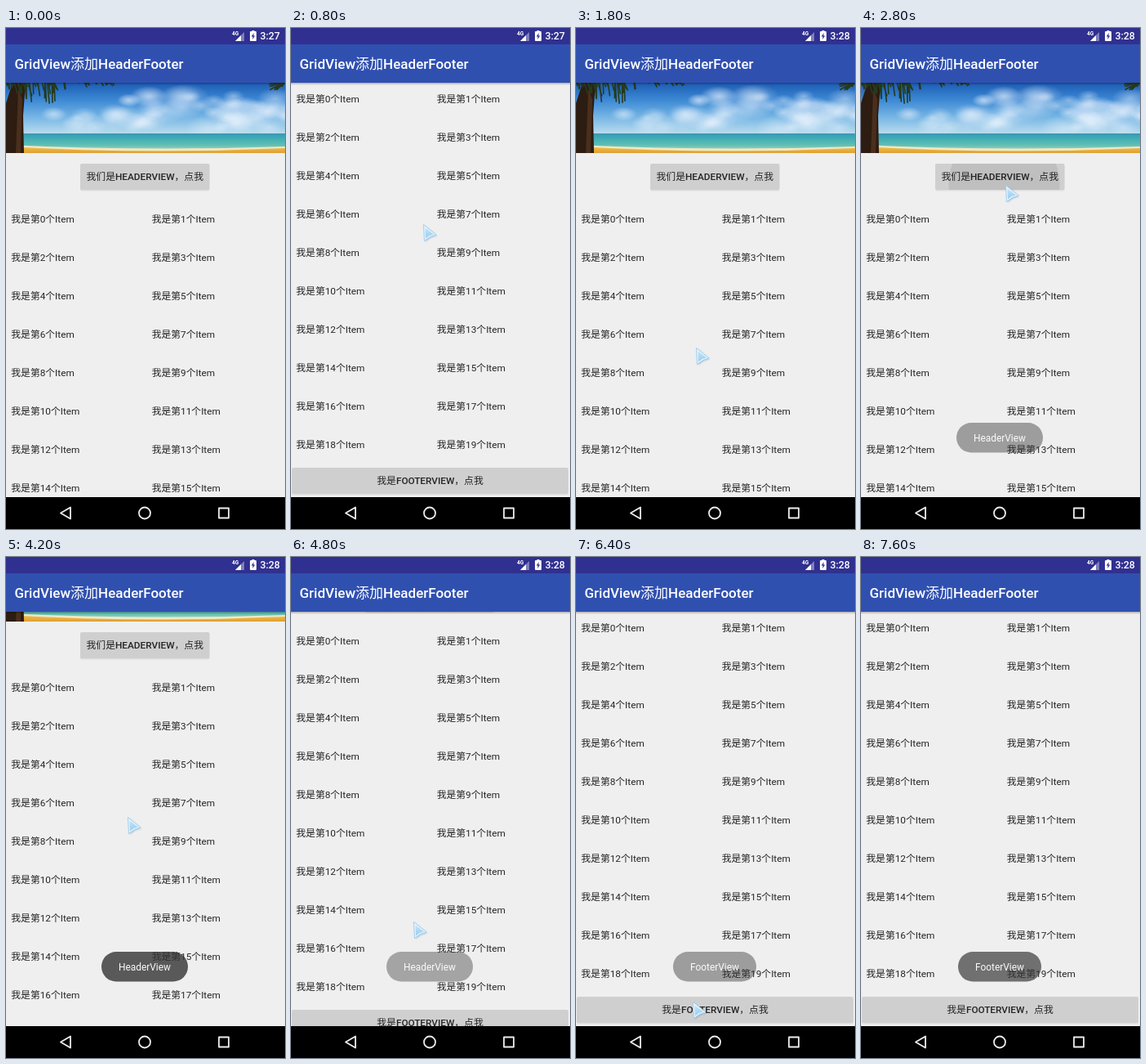
An HTML page with a canvas that plays this animation: 342 by 613 pixels, repeating every 8400 ms.

```html
<!DOCTYPE html>
<html lang="zh-CN">
<head>
<meta charset="utf-8">
<title>GridView</title>
<style>
  html, body { margin: 0; width: 100%; height: 100%; overflow: hidden; background: #000; }
  canvas { display: block; width: 342px; height: 613px; }
</style>
</head>
<body>
<canvas id="stage" width="342" height="613"></canvas>
<script>
const ctx = document.getElementById('stage').getContext('2d');
const W = 342, H = 613, LOOP = 8400, STEP = 200, REST = 7600;
const LIST_TOP = 67, LIST_BOTTOM = 574, MAX_SCROLL = 147, ROW = 47;

// Places the pointer stops at: time, x, y
const STOPS = [
  [200, 158, 362], [800, 162, 240], [1200, 155, 326], [1800, 147, 391],
  [2400, 177, 192], [2800, 177, 192], [3800, 152, 410], [4200, 149, 318],
  [5600, 150, 508], [6800, 142, 548], [REST, 310, 556]
];

const clamp = v => Math.min(1, Math.max(0, v));
const easeOut = (p, power) => 1 - (1 - clamp(p)) ** power;
const glide = (t, from, to) => easeOut((t - from) / (to - from), 3);
const fade = (t, from, to) => clamp(Math.min((t - from) / 360, (to - t) / 400));

function scrollAt(t) {
  return Math.round(MAX_SCROLL * (glide(t, 0, 800) - glide(t, 1000, 1788) + glide(t, 3800, 5720)));
}

function pointerAt(t) {
  const i = STOPS.findIndex(s => s[0] > t);
  const [t0, x0, y0] = STOPS[i - 1], [t1, x1, y1] = STOPS[i];
  const k = easeOut((t - t0) / (t1 - t0), 2);
  return [Math.round(x0 + (x1 - x0) * k), Math.round(y0 + (y1 - y0) * k)];
}

function seeded(seed) {
  return () => (seed = (seed * 16807) % 2147483647) / 2147483647;
}

function rect(x, y, w, h, color) {
  ctx.fillStyle = color;
  ctx.fillRect(x, y, w, h);
}

function roundRect(x, y, w, h, r, color) {
  ctx.beginPath();
  ctx.roundRect(x, y, w, h, r);
  ctx.fillStyle = color;
  ctx.fill();
}

function polygon(points, color) {
  ctx.beginPath();
  points.forEach(p => ctx.lineTo(...p));
  ctx.closePath();
  ctx.fillStyle = color;
  ctx.fill();
}

function circle(x, y, r, color) {
  ctx.beginPath();
  ctx.arc(x, y, r, 0, Math.PI * 2);
  ctx.fillStyle = color;
  ctx.fill();
}

function clipped(x, y, w, h, paint) {
  ctx.save();
  ctx.beginPath();
  ctx.rect(x, y, w, h);
  ctx.clip();
  paint();
  ctx.restore();
}

function vertical(y0, y1, ...colors) {
  const g = ctx.createLinearGradient(0, y0, 0, y1);
  colors.forEach((c, i) => g.addColorStop(i / (colors.length - 1), c));
  return g;
}

// Chinese runs stay regular while Latin runs take the given weight.
function text(str, x, y, size, color, weight = 400, centered = false) {
  const runs = str.match(/[\u3000-\uffef]+|[^\u3000-\uffef]+/g).map(s => {
    const font = s.charCodeAt(0) >= 0x3000
      ? `400 ${size}px "Noto Sans CJK SC", "Noto Sans CJK", sans-serif`
      : `${weight} ${size}px Roboto, sans-serif`;
    ctx.font = font;
    return { s, font, width: ctx.measureText(s).width };
  });
  if (centered) x -= runs.reduce((sum, r) => sum + r.width, 0) / 2;
  ctx.fillStyle = color;
  for (const r of runs) {
    ctx.font = r.font;
    ctx.fillText(r.s, x, y);
    x += r.width;
  }
}

function puff(x, y, r, alpha) {
  const g = ctx.createRadialGradient(0, 0, 0, 0, 0, r);
  g.addColorStop(0, `rgba(240,246,254,${alpha})`);
  g.addColorStop(1, 'rgba(240,246,254,0)');
  ctx.save();
  ctx.translate(x, y);
  ctx.scale(1.8, 1);
  circle(0, 0, r, g);
  ctx.restore();
}

function clouds() {
  const rnd = seeded(77);
  for (let i = 0; i < 46; i++) {
    const x = 150 + rnd() * 200;
    puff(x, 16 + rnd() * 40, 6 + rnd() * 10, 0.42);
  }
  for (let i = 0; i < 16; i++) puff(30 + rnd() * 140, 36 + rnd() * 22, 5 + rnd() * 8, 0.35);
}

function palm() {
  polygon([[8, 0], [24, 0], [21, 40], [22, 86], [0, 86], [0, 25]], '#2c1c12');
  polygon([[15, 8], [20, 20], [18, 86], [12, 86]], '#4a2f1c');
  const rnd = seeded(11);
  ctx.strokeStyle = '#243a1c';
  ctx.lineWidth = 1.6;
  ctx.beginPath();
  for (let i = 0; i < 60; i++) {
    const x = 130 * rnd() ** 1.4;
    const drop = (4 + 28 * Math.exp(-(((x - 42) / 32) ** 2))) * rnd();
    ctx.moveTo(x, -2);
    ctx.lineTo(x + 6 * rnd(), drop);
  }
  for (let i = 0; i < 12; i++) {
    ctx.moveTo(W + 2, -3);
    ctx.lineTo(W - 22 * rnd(), 9 * rnd());
  }
  ctx.stroke();
}

function shore(left, middle, right, color) {
  ctx.beginPath();
  ctx.moveTo(0, left);
  ctx.quadraticCurveTo(W / 2, middle, W, right);
  ctx.lineTo(W, 87);
  ctx.lineTo(0, 87);
  ctx.fillStyle = color;
  ctx.fill();
}

function beach(top) {
  ctx.save();
  ctx.translate(0, top);
  clipped(0, 0, W, 86, () => {
    rect(0, 0, W, 62, vertical(0, 62, '#1c5cb4', '#3c88d4', '#74b4e4', '#b8dcee'));
    clouds();
    rect(0, 62, W, 24, vertical(62, 84, '#3898b4', '#44b0b4', '#64c0b4', '#b4d8c4'));
    shore(76, 84, 78, '#f0e8c4');
    shore(78, 88, 80, vertical(78, 86, '#f0c050', '#e0a030'));
    palm();
  });
  ctx.restore();
}

function button(x, y, w, label) {
  roundRect(x, y + 1, w, 32.5, 2, 'rgba(0,0,0,0.07)');
  roundRect(x, y, w, 32, 2, '#cfcfcf');
  text(label, x + w / 2, y + 20, 11.8, '#242424', 500, true);
}

function list(scroll, pressed) {
  clipped(0, LIST_TOP, W, LIST_BOTTOM - LIST_TOP, () => {
    rect(0, LIST_TOP, W, LIST_BOTTOM - LIST_TOP, '#efefef');
    beach(LIST_TOP - scroll);
    button(91, 166 - scroll, 158.5, '我们是HEADERVIEW，点我');
    if (pressed) clipped(91, 166, 158, 32, () => circle(175.5, 191, 68, 'rgba(0,0,0,0.08)'));
    for (let i = 0; i < 20; i++) {
      const y = 238 + Math.floor(i / 2) * ROW - scroll;
      text(`我是第${i}个Item`, i % 2 ? 178.7 : 6.3, y, 11.8, '#262626');
    }
    button(1, 685 - scroll, 339, '我是FOOTERVIEW，点我');
    rect(0, LIST_TOP, W, 3, vertical(67, 70, 'rgba(0,0,0,0.28)', 'rgba(0,0,0,0)'));
  });
}

function statusBar(clock) {
  rect(0, 0, W, 20, '#303090');
  text('4G', 277, 9, 6.5, '#fff', 700);
  polygon([[292, 5], [292, 16], [281, 16]], '#8080bc');
  polygon([[288, 9], [288, 16], [281, 16]], '#fff');
  rect(301.5, 3, 3, 2, '#fff');
  roundRect(299, 4, 8, 12, 1, '#fff');
  polygon([[303.7, 6], [300.8, 10.6], [302.6, 10.6], [302.3, 14], [305.2, 9.4], [303.4, 9.4]], '#303090');
  text(clock, 311.5, 14, 12.4, '#fff', 500);
}

function navigationBar() {
  rect(0, LIST_BOTTOM, W, H - LIST_BOTTOM, '#000');
  ctx.strokeStyle = '#ececec';
  ctx.lineWidth = 1.8;
  ctx.lineJoin = 'round';
  ctx.beginPath();
  ctx.moveTo(67, 593.5);
  ctx.lineTo(79, 586.5);
  ctx.lineTo(79, 600.5);
  ctx.closePath();
  ctx.moveTo(177, 593.5);
  ctx.arc(170, 593.5, 7, 0, Math.PI * 2);
  ctx.rect(261, 587.5, 12, 12);
  ctx.stroke();
}

function toast(label, width, alpha) {
  if (alpha === 0) return;
  roundRect(170 - width / 2, 483, width, 36.5, 18.2, `rgba(52,52,52,${0.8 * alpha})`);
  text(label, 170, 506, 11.9, '#fafafa', 400, true);
}

function pointer(x, y) {
  ctx.save();
  ctx.translate(x, y);
  ctx.lineJoin = 'round';
  ctx.shadowColor = 'rgba(60,120,170,0.4)';
  ctx.shadowBlur = 2;
  ctx.shadowOffsetX = ctx.shadowOffsetY = 1;
  polygon([[0.5, 0.5], [16, 13], [8.5, 15.5], [1.5, 20.5]], '#e8f4fc');
  ctx.shadowColor = 'transparent';
  ctx.strokeStyle = '#a4d0ee';
  ctx.lineWidth = 1;
  ctx.stroke();
  polygon([[2.5, 4.5], [13, 12.6], [7.5, 14], [3, 17.5]], vertical(4, 17, '#c4e4f8', '#98cef0'));
  ctx.restore();
}

function draw(t) {
  list(scrollAt(t), t >= 2800 && t < 3000);
  rect(0, 20, W, 47, '#3050b0');
  text('GridView添加HeaderFooter', 10.5, 50, 17, '#fff', 500);
  statusBar(t < 1200 ? '3:27' : '3:28');
  navigationBar();
  toast('HeaderView', 106, fade(t, 2600, 5000));
  toast('FooterView', 102, fade(t, 6200, 7940));
  if (t >= STOPS[0][0] && t < REST) pointer(...pointerAt(t));
}

const start = performance.now();
function tick() {
  const t = (performance.now() - start) % LOOP;
  draw(Math.min(REST, Math.floor(t / STEP) * STEP));
  requestAnimationFrame(tick);
}
tick();
</script>
</body>
</html>
```
